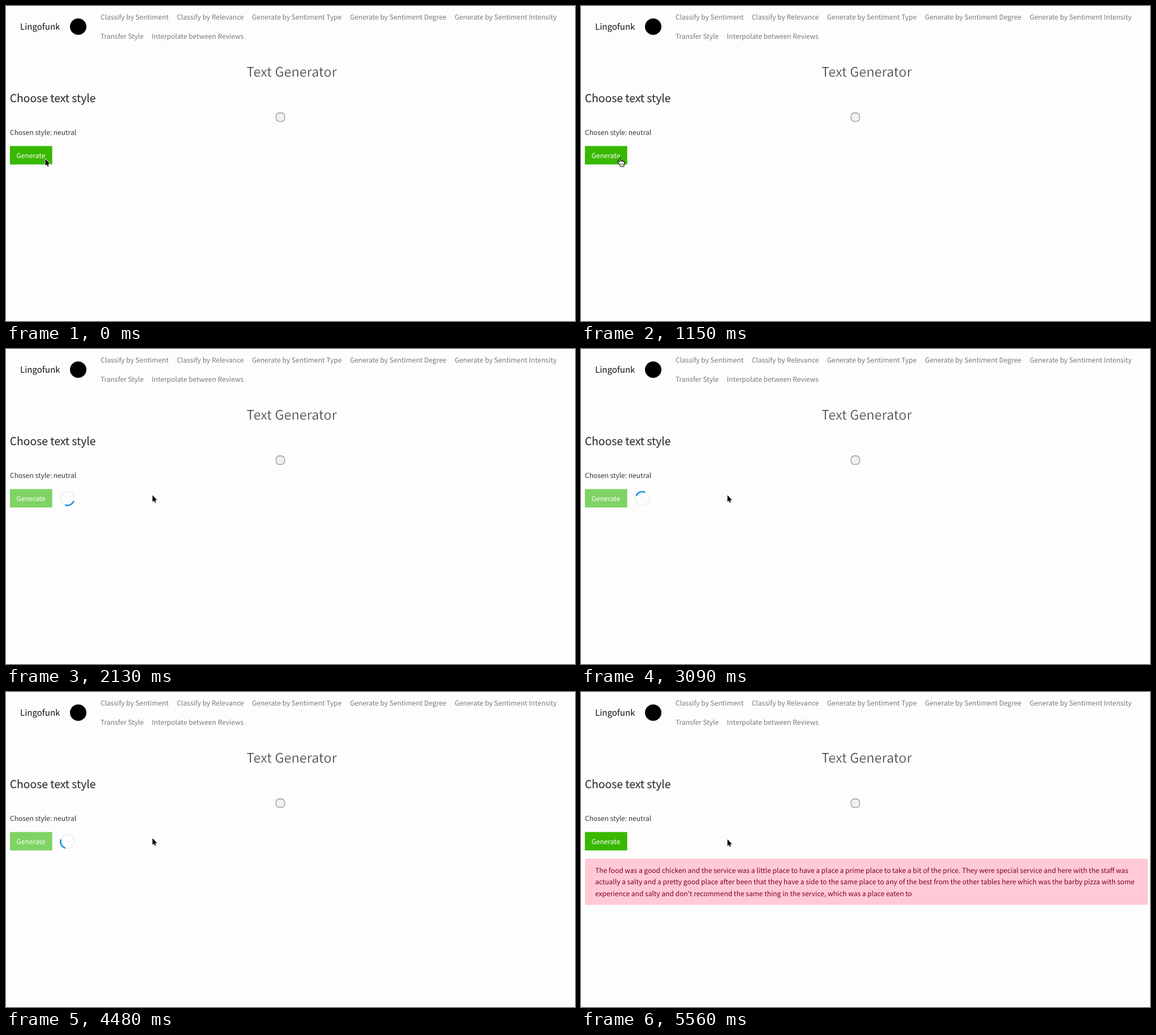
Animation of 1005 by 557 pixels, one loop 8000 ms. Source, as an HTML page:

```html
<!DOCTYPE html>
<html lang="en">
<head>
<meta charset="utf-8">
<title>Text Generator</title>
<style>
  html, body { margin: 0; width: 100%; height: 100%; overflow: hidden; background: #fdfdfd; }
  svg { display: block; width: 100vw; height: 100vh; }
  text {
    font: 400 12.03px "Noto Sans CJK JP", "Noto Sans CJK SC", "Noto Sans CJK", "Open Sans", sans-serif;
    fill: #323537;
    text-rendering: geometricPrecision;
    white-space: pre;
  }
  .nav text { fill: #797979; }
  .brand { font-size: 15.05px; fill: #111; }
  .title { font-size: 23.4px; font-weight: 300; stroke: #fdfdfd; stroke-width: .5px; text-anchor: middle; }
  .heading { font-size: 19.3px; stroke: #323537; stroke-width: .2px; }
  .label { fill: #fff; }
  .result text { fill: #7d0020; }
</style>
</head>
<body>
<svg viewBox="0 0 1005 557">
  <text class="brand" x="25" y="42">Lingofunk</text>
  <circle cx="127.5" cy="36.5" r="14.5" fill="#000"/>
  <g class="nav">
    <text x="167" y="24">Classify by Sentiment</text>
    <text x="301.7" y="24">Classify by Relevance</text>
    <text x="434.5" y="24">Generate by Sentiment Type</text>
    <text x="607.4" y="24">Generate by Sentiment Degree</text>
    <text x="792.4" y="24">Generate by Sentiment Intensity</text>
    <text x="167" y="58.4">Transfer Style</text>
    <text x="257.6" y="58.4">Interpolate between Reviews</text>
  </g>

  <text class="title" x="504.5" y="125.4">Text Generator</text>
  <text class="heading" x="6.8" y="169.6">Choose text style</text>

  <rect id="focus" x="6.5" y="184.5" width="995" height="24" fill="none" stroke="#000" stroke-dasharray="1 1"/>
  <rect x="476.9" y="189" width="15.2" height="15.2" rx="5.8" fill="#f0f0f0" stroke="#979797" stroke-width="1.3"/>
  <text x="7" y="228">Chosen style: neutral</text>

  <rect id="button" x="6.9" y="247.6" width="74.7" height="32.6"/>
  <text class="label" x="18.5" y="268.8">Generate</text>

  <g id="spinner" fill="none" stroke-width="2.7">
    <circle cx="108.4" cy="264.4" r="12.1" stroke="#f2f2f2"/>
    <path id="arc" d="M99.84 255.84A12.1 12.1 0 0 1 116.96 255.84" stroke="#2196dc"/>
  </g>

  <g id="result" class="result">
    <rect x="7" y="294.5" width="994" height="82" rx="3.6" fill="#ffcad6"/>
    <text x="25" y="320.2">The food was a good chicken and the service was a little place to have a place a prime place to take a bit of the price. They were special service and here with the staff was</text>
    <text x="25" y="340.4">actually a salty and a pretty good place after been that they have a side to the same place to any of the best from the other tables here which was the barby pizza with some</text>
    <text x="25" y="360.5">experience and salty and don't recommend the same thing in the service, which was a place eaten to</text>
  </g>

  <g id="pointer" stroke="#fff" stroke-linejoin="round">
    <path id="arrow" d="M0 0V11.8L2.6 9.4L4.3 13.3L6.1 12.5L4.5 8.7H8.2Z" fill="#000" stroke-width="1.6" paint-order="stroke"/>
    <g id="hand" stroke="#000" fill="#fff" stroke-width="1.1">
      <path d="M-1.6 9L-4.4 5.6C-5.6 4 -3.6 2.8 -2.5 4L-1.2 5.4L-2.6 .3C-2.9 -1.3 -.7 -1.7 -.2 -.2L1 4C1.2 2.7 3 2.7 3.3 4.2C3.8 3.2 5.3 3.4 5.5 4.8C6.3 4.2 7.3 4.9 7.3 6.2C7.4 9 6.6 10.6 6 13.5H-.2C-.4 11.5 -.8 10.2 -1.6 9Z"/>
      <path d="M1.3 8V11M3.3 8V11M5.2 8V11" stroke-width=".7"/>
    </g>
  </g>
</svg>
<script>
  const LOOP = 8000;
  const HOVER = 590, PRESS = 1130, CLICK = 1240, DONE = 5560;
  const GLIDE = 500;

  // The screen refreshes in even steps; the spinner turns a little on each one.
  const REFRESH = 140.8, ORIGIN = 1380;
  const TURN = 26.3, TURN_AT_ORIGIN = 24;

  const onButton = { x: 69.5, y: 270.5 };
  const atRest = { x: 258.7, y: 258.5 };
  const NUDGE_AT = 4620, NUDGE = 2;

  const el = id => document.getElementById(id);
  const show = (id, on) => el(id).style.display = on ? "" : "none";
  const within = (t, from, to) => t >= from && t < to;
  const mix = (a, b, p) => a + (b - a) * p;
  const easeOut = (p, power) => 1 - (1 - p) ** power;

  function pointerAt(t) {
    const p = Math.min(1, Math.max(0, (t - CLICK) / GLIDE));
    return {
      x: mix(onButton.x, atRest.x, easeOut(p, 1.5)),
      y: mix(onButton.y, atRest.y, easeOut(p, 4)) + (t >= NUDGE_AT ? NUDGE : 0)
    };
  }

  function draw(t) {
    const refresh = Math.floor((t - ORIGIN) / REFRESH);
    const loading = within(t, CLICK, DONE);
    const hovering = within(t, HOVER, CLICK);
    const { x, y } = pointerAt(ORIGIN + refresh * REFRESH);

    show("focus", within(t, HOVER, PRESS));
    show("spinner", loading);
    show("result", t >= DONE);
    show("hand", hovering);
    show("arrow", !hovering);
    el("button").setAttribute("fill", loading ? "#7fd364" : "#38b800");
    el("pointer").setAttribute("transform", `translate(${x} ${y})`);
    el("arc").setAttribute("transform", `rotate(${TURN_AT_ORIGIN + refresh * TURN} 108.4 264.4)`);
  }

  const start = performance.now();
  function frame() {
    draw((performance.now() - start) % LOOP);
    requestAnimationFrame(frame);
  }
  frame();
</script>
</body>
</html>
```
